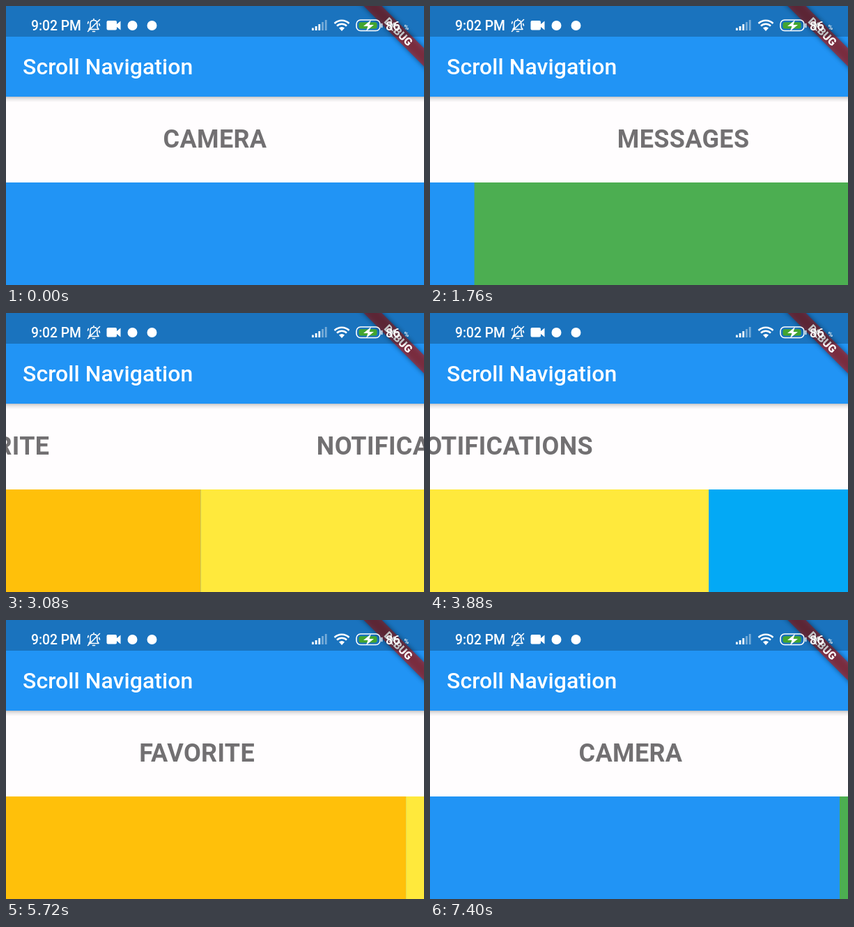
An HTML page for the animation above (7.44 s loop, 600 by 400 pixels).

```html
<!DOCTYPE html>
<html lang="en">
<head>
<meta charset="utf-8">
<title>Scroll Navigation</title>
<style>
  html, body { margin: 0; width: 100%; height: 100%; overflow: hidden; background: #2194f5; }
  svg { display: block; width: 100%; height: 100%; }
  text { font-family: Roboto, "Noto Sans", sans-serif; font-weight: 500; fill: #fff; }
  .heading { font-size: 32px; letter-spacing: .05px; }
  .tab { font-size: 36px; font-weight: 700; letter-spacing: .35px; fill: #727072; text-anchor: middle; }
  .status { font-size: 19.3px; }
  .debug { font-size: 15.6px; font-weight: 900; text-anchor: middle; }
  .line { fill: none; stroke: #fff; stroke-width: 1.6; stroke-linecap: round; stroke-linejoin: round; }
</style>
</head>
<body>
<svg viewBox="0 0 600 400">
  <defs>
    <linearGradient id="drop" x2="0" y2="1">
      <stop offset="0" stop-color="#000" stop-opacity=".22"/>
      <stop offset=".4" stop-color="#000" stop-opacity=".09"/>
      <stop offset="1" stop-color="#000" stop-opacity="0"/>
    </linearGradient>
    <filter id="blur" x="-20%" y="-60%" width="140%" height="220%">
      <feGaussianBlur stdDeviation="3.5"/>
    </filter>
  </defs>

  <rect y="130" width="600" height="123" fill="#fffdfe"/>
  <g id="strip"></g>

  <rect y="130" width="600" height="8" fill="url(#drop)"/>
  <rect width="600" height="130" fill="#2194f5"/>
  <text class="heading" x="24" y="97.5">Scroll Navigation</text>

  <g transform="translate(600 0) rotate(45)">
    <rect x="-90" y="42.8" width="180" height="18.4" fill="#000" opacity=".5" filter="url(#blur)"/>
    <rect x="-90" y="42.8" width="180" height="18.4" fill="#b71c1c" opacity=".63"/>
    <text class="debug" y="57.6">DEBUG</text>
  </g>

  <!-- the system bar dims everything beneath it -->
  <rect width="600" height="44" fill="#041018" opacity=".25"/>
  <text class="status" x="36" y="34.5">9:02 PM</text>

  <!-- muted bell -->
  <path class="line" d="M119 33.5h14l-2-3v-5c0-3-2-5-5-5s-5 2-5 5v5zM124.5 36.5h3M126 20v-1.5M117.5 36.5l17-17M117.5 25l.8-2.5M134.5 28l-.8-2.5"/>

  <!-- video camera -->
  <path d="M146.5 21h10.5a2 2 0 0 1 2 2v3l5.5-4.5v13l-5.5-4.5v2.5a2 2 0 0 1-2 2h-10.5a2 2 0 0 1-2-2v-9.5a2 2 0 0 1 2-2z" fill="#fff"/>

  <circle cx="181.5" cy="28" r="7" fill="#fff"/>
  <circle cx="209.5" cy="28" r="7" fill="#fff"/>

  <!-- signal -->
  <g fill="#fff">
    <rect x="439" y="31.5" width="2.8" height="3.5"/>
    <rect x="443.7" y="29" width="2.8" height="6"/>
    <rect x="448.4" y="26" width="2.8" height="9"/>
    <rect x="453.1" y="23" width="2.8" height="12" opacity=".4"/>
    <rect x="457.8" y="20" width="2.8" height="15" opacity=".4"/>
  </g>

  <!-- wifi -->
  <g class="line" style="stroke-width:2.5;stroke-linecap:butt">
    <path d="M471.5 25a15 15 0 0 1 21 0M475 28.7a10 10 0 0 1 14 0"/>
    <path d="M478 31.5a6 6 0 0 1 8 0l-4 4.5z" fill="#fff" stroke="none"/>
  </g>

  <!-- battery -->
  <rect class="line" x="503" y="20" width="34" height="15.5" rx="6"/>
  <path class="line" d="M539.5 25.5v5"/>
  <rect x="506.5" y="23.2" width="26" height="9.2" rx="3" fill="#43a52f"/>
  <path d="M524 20l-11 9h6.5l-2.5 7 11-9h-6.5z" fill="#fff"/>
  <text class="status" x="545" y="34.5" style="font-size:18.5px">86</text>
  <text x="571.5" y="33.5" style="font-size:9px">%</text>
</svg>

<script>
  const LOOP = 7440, STEP = 40, WIDTH = 600;
  const pages = [
    ["CAMERA", "#2194f5"],
    ["MESSAGES", "#4cae51"],
    ["FAVORITE", "#ffc00a"],
    ["NOTIFICATIONS", "#ffe93c"],
    ["HOME", "#03a9f5"]
  ];
  const DRAG = "cubic-bezier(.65,0,.6,1)";
  const FLICK = "cubic-bezier(.4,0,.15,1)";
  // start ms, end ms, page reached, easing
  const swipes = [
    [520, 2064, 1, DRAG],
    [2077, 2797, 2, FLICK],
    [2832, 3552, 3, FLICK],
    [3683, 4403, 4, FLICK],
    [4546, 5216, 3, FLICK],
    [5217, 5907, 2, FLICK],
    [5960, 6700, 1, FLICK],
    [6790, 7400, .02, FLICK]
  ];

  const strip = document.getElementById("strip");

  function add(tag, attrs, text = "") {
    const el = document.createElementNS("http://www.w3.org/2000/svg", tag);
    for (const key in attrs) el.setAttribute(key, attrs[key]);
    el.textContent = text;
    strip.append(el);
  }

  pages.forEach(([name, fill], i) => {
    const x = i * WIDTH;
    add("rect", { x, y: 253, width: WIDTH, height: 147, fill });
    add("text", { class: "tab", x: x + WIDTH / 2, y: 203 }, name);
  });

  const stop = (ms, page, easing = "linear") => ({
    offset: ms / LOOP,
    transform: `translateX(${-page * WIDTH}px)`,
    easing
  });

  const stops = [stop(0, 0)];
  let page = 0;
  for (const [start, end, next, easing] of swipes) {
    stops.push(stop(start, page, easing), stop(end, next));
    page = next;
  }
  stops.push(stop(LOOP, page));

  const scroll = strip.animate(stops, { duration: LOOP, fill: "both" });
  scroll.pause();

  function draw() {
    const t = (performance.now() + 8) % LOOP;
    scroll.currentTime = Math.floor(t / STEP) * STEP;
    requestAnimationFrame(draw);
  }
  draw();
</script>
</body>
</html>
```
